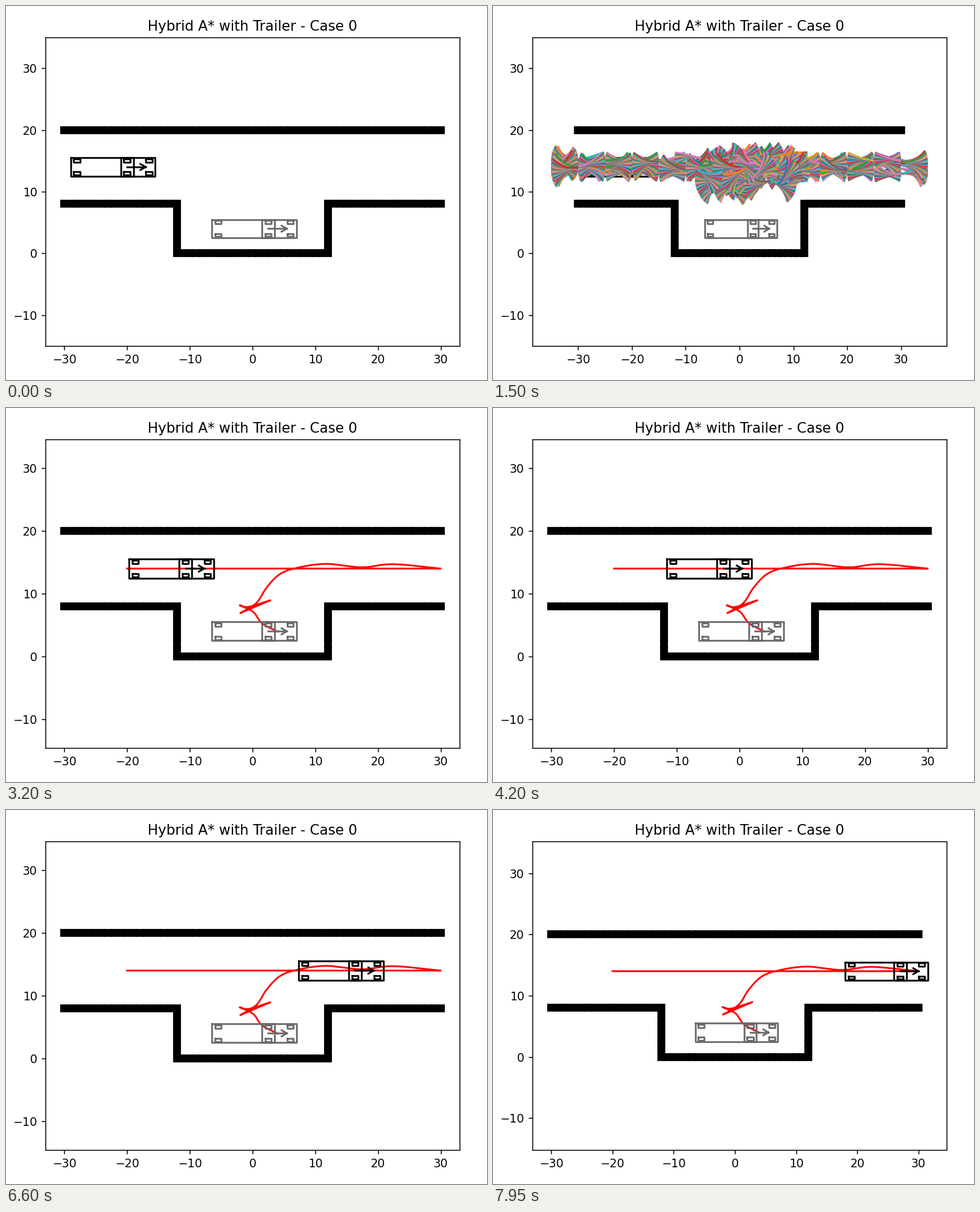
Recreate the animation shown at these times as a matplotlib script. Size 720 by 560 pixels, loop 8 s.

```python
import numpy as np
import matplotlib.pyplot as plt
from matplotlib.animation import FuncAnimation
from matplotlib.collections import LineCollection

DPI, W, H = 125, 720, 560
AX_W, AX_H = 620, 462
STEP_MS, LOOP_MS = 50, 8000
DRIVE_MS = 2050            # search ends, driving begins
LANE_Y = 14
ARC, WHEELBASE = 5.0, 3.5
STEERS = np.linspace(-0.6, 0.6, 21)
PALETTE = ["C" + c for c in "6026956842619573"]

rng = np.random.default_rng(4)

fig = plt.figure(figsize=(W / DPI, H / DPI), dpi=DPI)
ax = fig.add_axes([59 / W, 51 / H, AX_W / W, AX_H / H])
ax.set_title("Hybrid A* with Trailer - Case 0")
ax.set_xticks(range(-30, 31, 10))
ax.set_yticks(range(-10, 31, 10))


# --- scene -----------------------------------------------------------------
def walls():
    pts = [(x, 20) for x in range(-30, 31)]
    pts += [(x, 8 if abs(x) >= 12 else 0) for x in range(-30, 31)]
    pts += [(s * 12, y) for s in (-1, 1) for y in range(8)]
    return np.array(pts).T


def box(x0, x1, half, y=0):
    return [x0, x0, x1, x1, x0], [y + half, y - half, y - half, y + half, y + half]


def truck_parts():
    """Outlines of tractor, trailer, wheels and heading arrow around the rear axle."""
    parts = [box(-1, 4.5, 1.5), box(-9, 1, 1.5)]
    parts += [box(x - 0.5, x + 0.5, 0.25, y)
              for x in (-8, 0, WHEELBASE) for y in (-1.05, 1.05)]
    tip, barb = 0.85 * WHEELBASE, 0.28 * WHEELBASE
    bx, by = tip - barb * np.cos(np.pi / 6), barb * np.sin(np.pi / 6)
    parts += [([0, tip], [0, 0])] + [([tip, bx], [0, s * by]) for s in (1, -1)]
    return [np.array(p, float) for p in parts]


class Truck:
    def __init__(self, color):
        self.parts = truck_parts()
        self.lines = [ax.plot([], [], color=color)[0] for _ in self.parts]

    def place(self, x, y):
        for line, part in zip(self.lines, self.parts):
            line.set_data(part[0] + x, part[1] + y)


def smooth(pts, n=14):
    """Catmull-Rom curve through the points."""
    p = np.array(pts, float)
    p = np.vstack([2 * p[0] - p[1], p, 2 * p[-1] - p[-2]])
    t = np.linspace(0, 1, n)[:, None]
    return np.vstack([
        0.5 * (2 * b + (c - a) * t + (2 * a - 5 * b + 4 * c - d) * t**2
               + (3 * b - a - 3 * c + d) * t**3)
        for a, b, c, d in zip(p, p[1:], p[2:], p[3:])])


def planned_path():
    """Forward along the lane, back in an S, then a three-point turn into the bay."""
    far, low, high, left = (30, LANE_Y), (-1.95, 6.9), (2.85, 8.95), (-2.05, 8.15)
    legs = [
        [(-20, LANE_Y), far],
        [far, (22.4, 14.7), (17.4, 14.2), (11.6, 14.75), (6.8, 14.05),
         (4.2, 13), (2.2, 10.9), (0.6, 8.5), low],
        [low, high],
        [high, (-0.6, 7.9), left],
        [left, (0.1, 7.1), (1.5, 5.3), (4, 3.95)],
    ]
    return np.vstack([smooth(leg) for leg in legs]).T


# --- search tree -----------------------------------------------------------
def make_room(half, flare, mid_y, rise):
    """Lane that flares past the walls, joined with a rounded block in the middle."""
    def inside(x, y):
        lane = abs(y - LANE_Y) < half + flare * np.clip(abs(x) - 30, 0, 1)
        block = (abs(x - 1.1) / 9.8)**5 + (abs(y - mid_y) / rise)**5 < 1
        return (lane | block) & (abs(x) < 35.1)
    return inside


lane_room = make_room(2.4, 1.1, 13, 5.2)
full_room = make_room(2.6, 1.9, 10, 8.8)
arcs = []  # (time, curve)


def fan(t, x, y, yaw, way, room, n=7):
    """All steering arcs from one pose that stay inside the room."""
    ds = ARC / n
    bend = np.tan(STEERS)[:, None] / WHEELBASE
    head = yaw + way * bend * ds * (np.arange(n) + 0.5)
    start = np.zeros((len(STEERS), 1))
    xs = x + np.hstack([start, np.cumsum(way * ds * np.cos(head), axis=1)])
    ys = y + np.hstack([start, np.cumsum(way * ds * np.sin(head), axis=1)])
    for cx, cy in zip(xs, ys):
        if room(cx, cy).all():
            arcs.append((t, np.column_stack([cx, cy])))


def strand(t, a, b, c, width=0.4, n=7):
    """A bundle of parallel quadratic curves."""
    u = np.linspace(0, 1, 10)[:, None]
    curve = (1 - u)**2 * np.array(a) + 2 * u * (1 - u) * np.array(b) + u**2 * np.array(c)
    for dx in np.linspace(-width, width, n):
        arcs.append((t, curve + [dx, 0]))


def build_search():
    u = rng.uniform

    def either():
        return rng.choice([-1, 1])

    # the front runs both ways from the start, one arc length at a time
    for x in range(-35, 31, 5):
        t0 = 200 + (x + 20) * 13 if x >= -20 else 500 - (x + 20) * 28
        tilt = 0.25 if abs(x) >= 30 else 0.1
        for j in range(7):
            t = min(t0 + 50 * j, 1000)
            y, yaw = LANE_Y + u(-1.2, 1.2), u(-tilt, tilt)
            fan(t, x, y, yaw, 1, lane_room)
            if x == -30 or j % 3 == 0:
                fan(t, x, y, yaw, -1, lane_room)
    # turning attempts above the bay
    for t in np.linspace(850, 1490, 55):
        fan(t, u(-9, 9), u(11, 16), u(-0.7, 0.7), either(), lane_room)
    # everything reachable fills up
    for t in np.linspace(1510, 1850, 190):
        x = u(-34.5, 34.5)
        tilt = 0.6 if abs(x) > 29 else 0.15
        fan(t, x, LANE_Y + u(-2.2, 2.2), u(-tilt, tilt), either(), full_room)
    for t in np.linspace(1510, 1870, 270):
        fan(t, u(-8.5, 10.7), u(1.6, 18.4), u(-1.3, 1.3), either(), full_room)
    # loose strands bending away beyond both ends of the lane
    for sx in (-1, 1):
        for sy in (-1, 1):
            for inset in (0, 1.7):
                strand(1750 + 30 * inset, (sx * (34 - inset / 2), LANE_Y + 2.5 * sy),
                       (sx * (35.2 - inset), LANE_Y + 5.5 * sy),
                       (sx * (34.4 - inset), LANE_Y + (8.7 - inset / 2) * sy))


build_search()
arcs.sort(key=lambda a: a[0])
times = np.array([2000 if t > 1850 else t for t, _ in arcs])
curves = [c for _, c in arcs]
colors = [PALETTE[i % len(PALETTE)] for i in range(len(curves))]
lefts = np.minimum.accumulate([c[:, 0].min() for c in curves])
rights = np.maximum.accumulate([c[:, 0].max() for c in curves])

ax.plot(*walls(), "sk")
path, = ax.plot(*planned_path(), "r")
goal, truck = Truck("dimgray"), Truck("black")
goal.place(2.5, 4)
tree = LineCollection([], linewidths=1.5, zorder=3)
ax.add_collection(tree, autolim=False)


# --- animation -------------------------------------------------------------
def set_x(lo, hi):
    """Fit the x axis with a 5% margin and return its whole span."""
    pad = 0.05 * (hi - lo)
    ax.set_xlim(lo - pad, hi + pad)
    return hi - lo + 2 * pad


def show_search(ms):
    n = int(np.searchsorted(times, ms, side="right"))
    tree.set_segments(curves[:n])
    tree.set_color(colors[:n] or "C0")
    truck.place(-20, LANE_Y)
    set_x(min(-30, lefts[n - 1]) if n else -30, max(30, rights[n - 1]) if n else 30)
    ax.set_ylim(-15, 35)


def show_drive(ms):
    x = np.interp(ms, [DRIVE_MS, 5250, 6600, 7950], [-20, 5.93, 16.33, 27])
    truck.place(x, LANE_Y)
    half = set_x(-30, max(30, x + 4.5)) * AX_H / AX_W / 2
    ax.set_ylim(10 - half, 10 + half)


def update(i):
    ms = i * STEP_MS
    driving = ms >= DRIVE_MS
    path.set_visible(driving)
    tree.set_visible(not driving)
    (show_drive if driving else show_search)(ms)
    return []


anim = FuncAnimation(fig, update, frames=LOOP_MS // STEP_MS, interval=STEP_MS,
                     blit=False, repeat=True)
plt.show()
```
